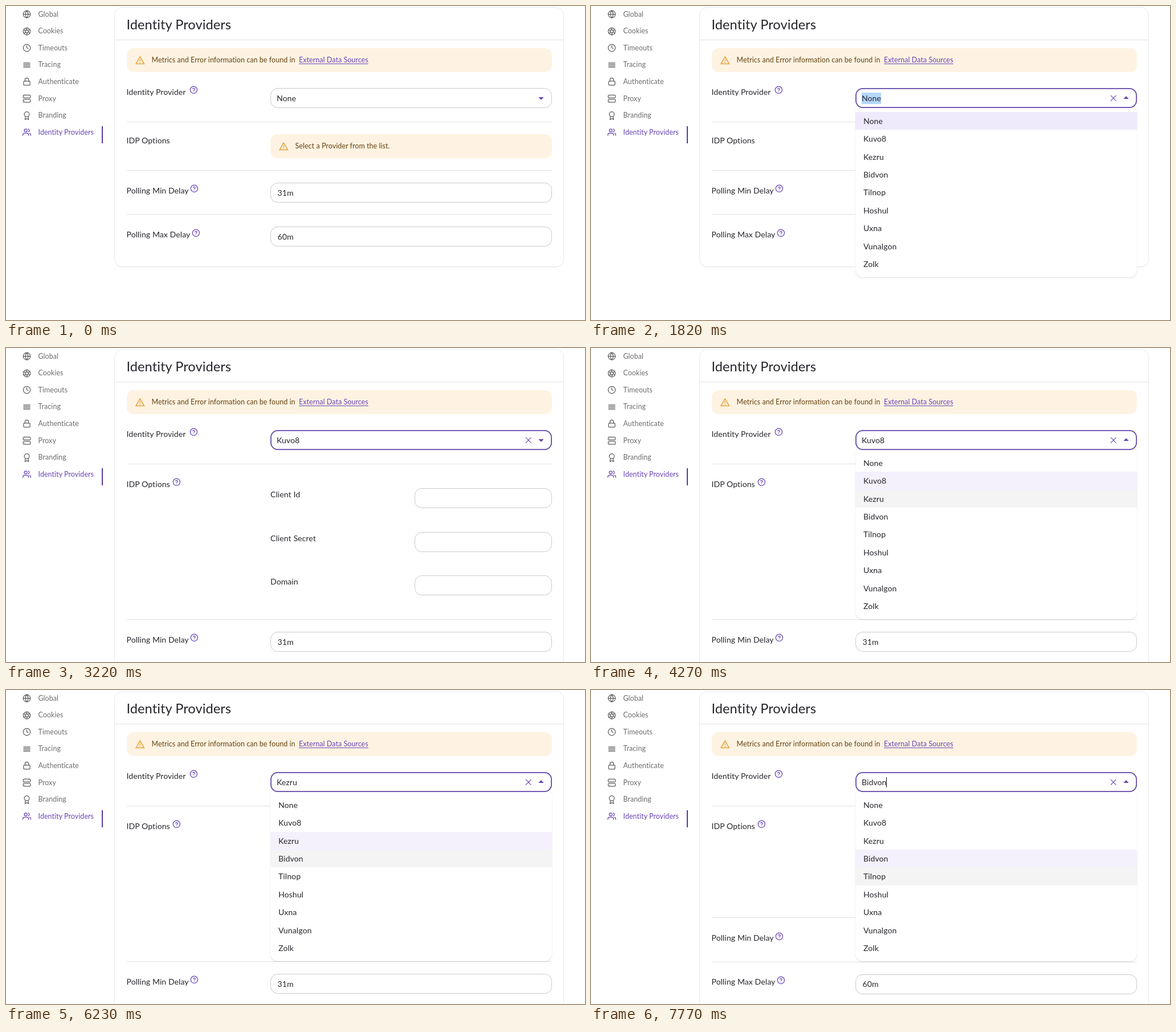
Animation of 1016x551 px, one loop 8 s. Source, as an HTML page:

```html
<!DOCTYPE html>
<html lang="en">
<head>
<meta charset="utf-8">
<title>Settings</title>
<style>
  html, body { margin: 0; width: 100%; height: 100%; overflow: hidden; background: #fff; }
  * { box-sizing: border-box; }
  #stage {
    position: relative; width: 1016px; height: 551px; overflow: hidden; background: #fff;
    font: 14px/20px Lato, "Open Sans", sans-serif; letter-spacing: .007em;
    color: #27252b; --purple: #6743b5;
  }
  #stage div, #stage svg { position: absolute; }
  .text { white-space: pre; }
  .small { font-size: 12.4px; }
  .title { font-size: 23.5px; }
  .nav { color: #6c6c6c; }
  .nav.on, .link { color: var(--purple); }
  .link { text-decoration: underline; text-underline-offset: 2px; text-decoration-thickness: 1px; }
  .note { color: #63400f; }
  .line { height: 1px; background: #e1e1e1; }
  .alert { height: 42px; border-radius: 12px; background: #fef3e2; }
  .card {
    left: 190px; top: 2px; width: 789px; border: 1px solid #e9e9e9; border-radius: 14px;
    box-shadow: 0 1px 1px rgba(0, 0, 0, .05);
  }
  .group { left: 0; top: 0; }
  svg { fill: none; stroke: currentColor; stroke-width: 2; stroke-linecap: round; stroke-linejoin: round; }
  svg.solid { fill: currentColor; stroke: none; }
  .field { --inset: .5px; fill: #fff; stroke: #c3c3c3; stroke-width: .9; }
  .field.hover { stroke: #27252b; }
  .field.focus { --inset: .9px; stroke: #5f45a8; stroke-width: 1.75; }
  .field rect {
    x: var(--inset); y: var(--inset); rx: 12px;
    width: calc(100% - 2 * var(--inset)); height: calc(100% - 2 * var(--inset));
  }
  #cross svg { stroke-width: 1.7; }
  #value { left: 475px; top: 152px; }
  #value.selected { background: #b4d7fd; }
  #caret { right: -1px; top: 1px; width: 1px; height: 18px; background: #111; }
  #popup {
    left: 464px; top: 179px; width: 494px; height: 296.5px; padding-top: 6.8px; background: #fff;
    border-radius: 4px 4px 13px 13px; box-shadow: 0 1px 2px rgba(0, 0, 0, .13), 0 0 1px rgba(0, 0, 0, .1);
    clip-path: inset(0 -4px -4px -4px);
  }
  #popup p { margin: 0; height: 31.4px; line-height: 31px; padding-left: 14px; }
  #popup .picked { background: #f4f1fd; }
  #popup .hover { background: #f4f4f4; }
  #popup .picked.hover { background: #eeeafc; }
</style>
</head>
<body>
<div id="stage"></div>
<script>
const ring = '<circle cx="12" cy="12" r="10"/>';
const path = d => `<path d="${d}"/>`;
const rect = (x, y, w, h) => `<rect x="${x}" y="${y}" width="${w}" height="${h}" rx="2"/>`;

const ICONS = {
  globe: ring + path('M2 12h20M12 2a15.3 15.3 0 0 1 4 10 15.3 15.3 0 0 1-4 10 15.3 15.3 0 0 1-4-10 15.3 15.3 0 0 1 4-10z'),
  shutter: ring + [0, 60, 120, 180, 240, 300]
    .map(a => `<path d="M9.7 8h11.5" transform="rotate(${a} 12 12)"/>`).join(''),
  clock: ring + path('M12 6v6l4 2'),
  rows: path('M3 6h18M3 10h18M3 14h18M3 18h18'),
  lock: rect(3, 11, 18, 11) + path('M7 11V7a5 5 0 0 1 10 0v4'),
  server: rect(2, 2, 20, 8) + rect(2, 14, 20, 8) + path('M6 6h.01M6 18h.01'),
  award: '<circle cx="12" cy="8" r="7"/>' + path('M8.2 13.9L7 23l5-3 5 3-1.2-9.1'),
  users: '<circle cx="9" cy="7" r="4"/>' + path('M17 21v-2a4 4 0 0 0-4-4H5a4 4 0 0 0-4 4v2M23 21v-2a4 4 0 0 0-3-3.9M16 3.1a4 4 0 0 1 0 7.8'),
  help: ring + path('M9.1 9a3 3 0 0 1 5.8 1c0 2-3 3-3 3M12 17h.01'),
  warn: path('M12 6l7.5 13h-15zM12 2L1 21h22zM11 16h2v2h-2zM11 10h2v4h-2z'),
  cross: path('M5 5l14 14M19 5L5 19'),
  down: path('M5 9h14l-7 7z'),
  up: path('M5 15h14l-7-7z')
};

// text and icon take the centre line y.
const text = (x, y, s, cls = '') =>
  `<div class="text ${cls}" style="left:${x}px;top:${y - 10}px">${s}</div>`;
const icon = (name, x, y, size, color, extra = '') =>
  `<svg viewBox="0 0 24 24" ${extra} width="${size}" height="${size}"
    style="left:${x - size / 2}px;top:${y - size / 2}px;color:${color}">${ICONS[name]}</svg>`;
const help = (x, y) => icon('help', x, y, 14.6, 'var(--purple)');
const line = (y, x = 212, w = 746) => `<div class="line" style="left:${x}px;top:${y}px;width:${w}px"></div>`;
const field = (x, top, w, id = '') =>
  `<svg class="field" id="${id}" width="${w}" height="35" style="left:${x}px;top:${top}px"><rect/></svg>`;
const alertBox = (x, top, w, s) =>
  `<div class="alert" style="left:${x}px;top:${top}px;width:${w}px"></div>` +
  icon('warn', x + 23.5, top + 21, 18.5, '#e8a33d', 'class="solid" fill-rule="evenodd"') +
  text(x + 43.5, top + 21, s, 'small note');
const option = (i, s) =>
  `<div class="group" id="option${i}">${text(464, 257 + 76.6 * i, s)}${field(717, Math.round(246 + 76.7 * i), 241, 'input' + i)}</div>`;

const NAV = [
  ['globe', 'Global'], ['shutter', 'Cookies'], ['clock', 'Timeouts'], ['rows', 'Tracing'],
  ['lock', 'Authenticate'], ['server', 'Proxy'], ['award', 'Branding'], ['users', 'Identity Providers']
];
const PROVIDERS = ['None', 'Kuvo8', 'Kezru', 'Bidvon', 'Tilnop', 'Hoshul', 'Uxna', 'Vunalgon', 'Zolk'];

const nav = NAV.map(([name, label], i) => {
  const y = 14.5 + 29.6 * i, on = i === NAV.length - 1;
  return icon(name, 36, y, 15, on ? 'var(--purple)' : '#5c5c5c') +
    text(56.5, y, label, 'small nav' + (on ? ' on' : ''));
}).join('');

const stage = document.getElementById('stage');
stage.innerHTML = `
  ${nav}
  <div style="left:168px;top:211px;width:2px;height:30px;background:#573a9d"></div>
  <div class="card" id="card"></div>
  ${text(211.5, 31.5, 'Identity Providers', 'title')}
  ${line(59, 191, 787)}
  ${alertBox(212, 74, 746, 'Metrics and Error information can be found in')}
  ${text(514, 95, 'External Data Sources', 'small link')}
  ${text(211.5, 150.5, 'Identity Provider')}${help(329.3, 147.5)}
  ${field(464, 144, 494, 'select')}
  <div class="text" id="value"><span id="name"></span><div id="caret"></div></div>
  <div class="group" id="cross">${icon('cross', 916.5, 161.5, 15.5, 'var(--purple)')}</div>
  <div class="group" id="down">${icon('down', 939.2, 161.5, 16, 'var(--purple)', 'class="solid"')}</div>
  <div class="group" id="up">${icon('up', 939.2, 161.2, 16, 'var(--purple)', 'class="solid"')}</div>
  ${line(203)}
  <div class="group" id="empty">
    ${text(211.5, 236, 'IDP Options')}
    ${alertBox(464, 225, 494, 'Select a Provider from the list.')}
  </div>
  <div class="group" id="options">
    ${text(211.5, 238.5, 'IDP Options')}${help(299, 235.5)}
    ${option(0, 'Client Id')}${option(1, 'Client Secret')}${option(2, '<span id="third"></span>')}
  </div>
  <div class="group" id="rest">
    ${line(288)}
    ${text(211.5, 323.5, 'Polling Min Delay')}${help(330.3, 320.5)}
    ${field(464, 310, 494)}${text(476.5, 327.5, '31m')}
    ${line(365.4)}
    ${text(211.5, 401, 'Polling Max Delay')}${help(333, 398)}
    ${field(464, 387.4, 494)}${text(476.5, 405, '60m')}
  </div>
  <div id="popup">${PROVIDERS.map(p => `<p>${p}</p>`).join('')}</div>`;

const $ = id => document.getElementById(id);
const show = (id, on) => { $(id).style.display = on ? '' : 'none'; };
const setField = (id, state) => $(id).setAttribute('class', 'field ' + state);
const rows = [...document.querySelectorAll('#popup p')];

const LOOP = 8000, TICK = 70, BLINK = 530, HOVER_AT = 1260;
// Menu visits: open, pointer reaches the next row, click on it.
const VISITS = [[1820, 2030, 2660], [3640, 3850, 4620], [5530, 5880, 6580], [7350, 7770, LOOP]];
const SHIFT = [0, 188, 188, 111.4];
const within = (t, a, b) => t >= a && t < b;

function render(ms) {
  const t = Math.floor(ms % LOOP / TICK) * TICK;
  const picked = VISITS.filter(v => t >= v[2]).length;
  const [open, settle] = VISITS[picked];
  const isOpen = t >= open;
  const focused = t >= VISITS[0][0];

  $('name').textContent = PROVIDERS[picked];
  $('value').className = 'text' + (focused && !picked ? ' selected' : '');
  const since = picked ? t - VISITS[picked - 1][2] : 0;
  show('caret', picked && Math.floor(since / BLINK) % 2 === 0);

  setField('select', focused ? 'focus' : t >= HOVER_AT ? 'hover' : '');
  show('cross', t >= HOVER_AT);
  show('up', isOpen);
  show('down', !isOpen);

  show('empty', !picked);
  show('options', picked);
  show('option2', picked < 3);
  $('third').textContent = picked === 1 ? 'Domain' : 'Directory Id';
  setField('input0', within(t, 4620, 4900) || within(t, 6720, 6790) ? 'hover' : '');
  $('rest').style.top = SHIFT[picked] + 'px';
  $('card').style.height = 456 + SHIFT[picked] + 'px';

  // The pointer crosses one row per tick until it settles.
  show('popup', isOpen);
  const at = picked + 1 - Math.max(0, Math.ceil((settle - t) / TICK));
  const hover = at < 0 ? picked : at;
  rows.forEach((row, i) => {
    row.className = (i === picked ? 'picked ' : '') + (i === hover ? 'hover' : '');
  });
}

function loop() {
  render(performance.now());
  requestAnimationFrame(loop);
}
loop();
</script>
</body>
</html>
```
